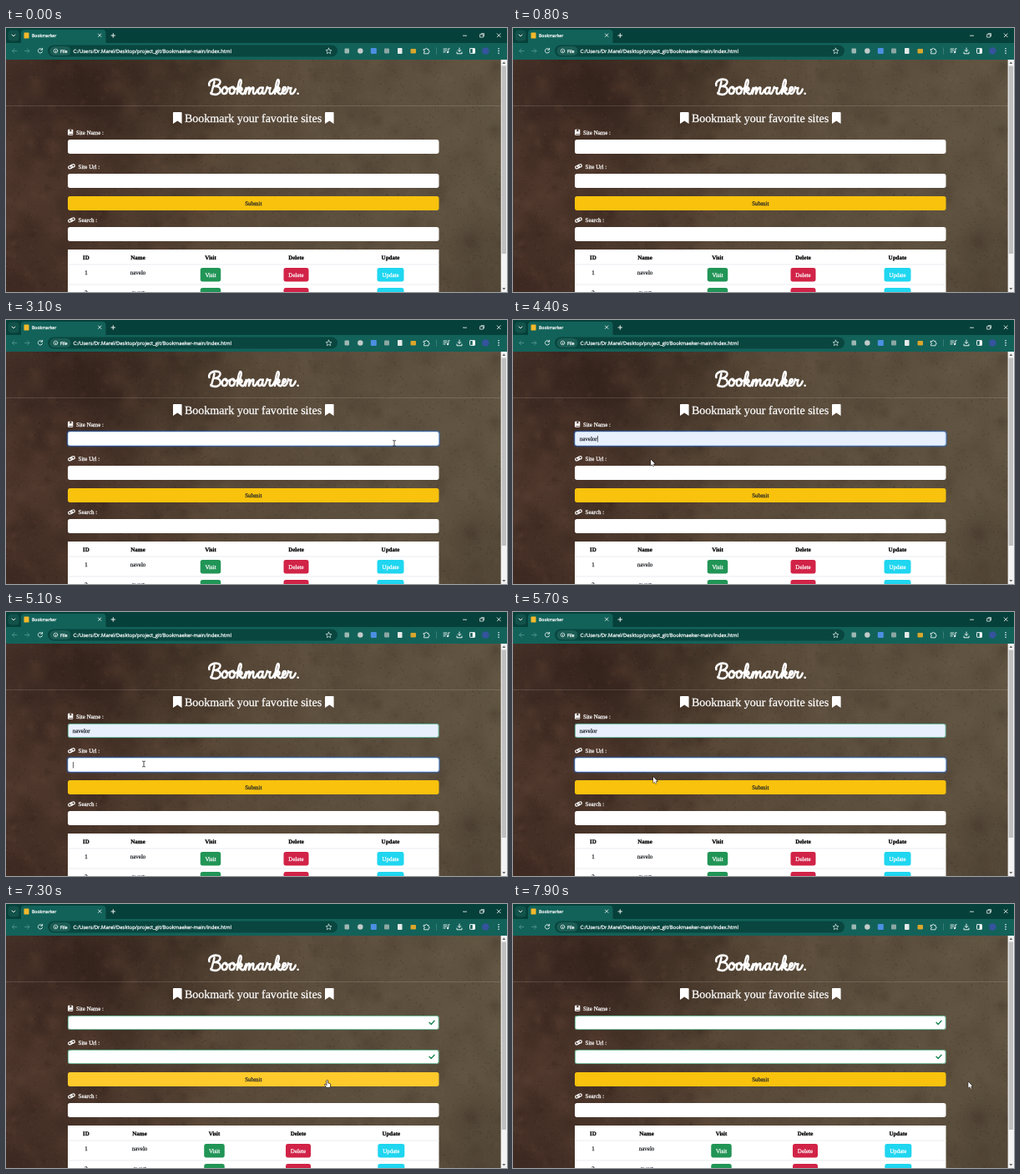
An HTML page with a canvas for the animation above (8 s loop, 600 px wide and 317 px high).

```html
<!DOCTYPE html>
<html lang="en">
<head>
<meta charset="utf-8">
<title>Bookmarker</title>
<style>
html, body { margin: 0; width: 100%; height: 100%; overflow: hidden; background: #4c3a2e; }
canvas { display: block; width: 600px; height: 317px; }
</style>
</head>
<body>
<canvas id="stage" width="600" height="317" role="img" aria-label="Bookmarker. Bookmark your favorite sites"></canvas>
<script>
const W = 600, H = 317, LOOP = 8000, PAGE_W = 592.7;
const SERIF = '"Liberation Serif", serif', SANS = '"Open Sans", sans-serif';
const LEFT = 74, WIDTH = 444.5, FIELD_H = 17;
const NAME_Y = 134, URL_Y = 175, SUBMIT_Y = 202, SEARCH_Y = 239;
const SITE = 'navelor', SITE_URL = 'navelor.com';
const T = { focusName: 2600, fillName: 4200, focusUrl: 4800, fillUrl: 5900, submit: 6700 };
const GREEN = '#198754';

const screen = document.getElementById('stage').getContext('2d');
const backdrop = document.createElement('canvas');
backdrop.width = W;
backdrop.height = H;
let g = backdrop.getContext('2d');

function rect(x, y, w, h, color) {
  g.fillStyle = color;
  g.fillRect(x, y, w, h);
}
function box(x, y, w, h, r, color) {
  g.beginPath();
  g.roundRect(x, y, w, h, r);
  g.fillStyle = color;
  g.fill();
}
function outline(x, y, w, h, r, color, line) {
  g.beginPath();
  g.roundRect(x, y, w, h, r);
  g.strokeStyle = color;
  g.lineWidth = line;
  g.stroke();
}
function disc(x, y, r, color) {
  g.beginPath();
  g.arc(x, y, r, 0, Math.PI * 2);
  g.fillStyle = color;
  g.fill();
}
function stroke(d, color = '#fff', line = 1) {
  g.strokeStyle = color;
  g.lineWidth = line;
  g.lineCap = g.lineJoin = 'round';
  g.stroke(new Path2D(d));
}
function fill(d, color = '#fff') {
  g.fillStyle = color;
  g.fill(new Path2D(d));
}
// A hairline around the glyphs keeps small text from looking thin.
function text(s, x, y, size, { color = '#fff', family = SERIF, align = 'left', weight = '' } = {}) {
  g.font = `${weight} ${size}px ${family}`;
  g.textRendering = 'geometricPrecision';
  g.textAlign = align;
  g.lineJoin = 'round';
  g.lineWidth = .25;
  g.fillStyle = g.strokeStyle = color;
  g.fillText(s, x, y);
  g.strokeText(s, x, y);
}
function at(x, y, draw) {
  g.save();
  g.translate(x, y);
  draw();
  g.restore();
}

function glow(x, y, r, rgb, alpha) {
  const soft = g.createRadialGradient(x, y, 0, x, y, r);
  soft.addColorStop(0, `rgba(${rgb},${alpha})`);
  soft.addColorStop(1, `rgba(${rgb},0)`);
  g.fillStyle = soft;
  g.fillRect(x - r, y - r, 2 * r, 2 * r);
}

function drawWall() {
  let seed = 41;
  const rnd = () => (seed = (seed * 16807) % 2147483647) / 2147483647;
  const spot = () => [rnd() * PAGE_W, 38 + rnd() * 279];
  const base = g.createLinearGradient(0, 38, 592, 70);
  [[0, '#4b352b'], [.18, '#4a352a'], [.4, '#554535'], [.65, '#5c4e3d'], [1, '#5f5341']]
    .forEach(([p, c]) => base.addColorStop(p, c));
  rect(0, 38, PAGE_W, 279, base);
  glow(90, 75, 130, '36,22,17', .5);
  glow(215, 60, 70, '36,24,18', .3);
  glow(20, 317, 110, '40,22,18', .3);
  glow(590, 317, 120, '50,40,30', .35);
  glow(25, 190, 90, '104,66,50', .15);
  for (let i = 0; i < 700; i++) {
    const [x, y] = spot(), left = x < 250, dark = rnd() < .55;
    glow(x, y, 3 + rnd() ** 2 * 26, dark ? '30,17,13' : left ? '125,86,68' : '130,114,88', left ? .13 : .07);
  }
  for (let i = 0; i < 6500; i++) {
    const [x, y] = spot(), size = .6 + rnd() * .9;
    rect(x, y, size, size, rnd() < .52 ? 'rgba(25,14,10,.16)' : 'rgba(165,140,110,.11)');
  }
}

function drawBrowser() {
  rect(0, 0, W, 19, '#06403a');
  rect(0, 18, W, 20, '#12625a');
  box(2.5, 2.5, 13, 13, 4, '#12524a');
  stroke('M7 8l2 2 2-2', '#fff', .9);
  box(18, 2, 101.5, 20, [4, 4, 0, 0], '#12625a');
  box(21.5, 5.5, 6, 7, .5, '#f4b92b');
  text('Bookmarker', 31, 11, 5.1, { family: SANS });
  stroke('M110.5 7l3.4 3.4M113.9 7l-3.4 3.4', '#fff', .8);
  stroke('M126 9h4.6M128.3 6.7v4.6', '#fff', .9);
  stroke('M547.5 9.2h4', '#fff', .8);
  stroke('M568 7.7h3.4v3.4h-3.4zM569.2 6.6h3.3v3.3', '#fff', .7);
  stroke('M588.2 6.8l4 4M592.2 6.8l-4 4', '#fff', .8);

  stroke('M13 27.5H7.5M10 25l-2.5 2.5 2.5 2.5', '#4f948b', .9);
  stroke('M22.5 27.5H28M25.5 25l2.5 2.5-2.5 2.5', '#4f948b', .9);
  stroke('M43.3 25.8a2.7 2.7 0 1 0 .3 2.6M43.6 24.3v1.9h-1.9', '#e8f3f1', .9);
  box(50, 20.5, 347, 14, 7, '#08463f');
  box(52.5, 22, 25, 11, 5.5, '#1b5d55');
  g.beginPath();
  g.arc(59.5, 27.5, 2.3, 0, 7);
  g.strokeStyle = '#fff';
  g.lineWidth = .7;
  g.stroke();
  stroke('M59.5 27.3v1.3', '#fff', .7);
  text('File', 65, 29.5, 5.4, { family: SANS });
  text('C:/Users/Dr.Marel/Desktop/project_git/Bookmaeker-main/index.html', 80.5, 29.6, 5.92, { family: SANS });
  stroke('M386.5 24.2l1 2.2 2.4.3-1.8 1.6.5 2.4-2.1-1.2-2.1 1.2.5-2.4-1.8-1.6 2.4-.3z', '#e8f3f1', .7);

  box(405.5, 24.5, 5.5, 6, 1, '#9db7b1');
  disc(424.3, 27.5, 3.2, '#c3cbc9');
  box(436.8, 24, 7, 7, 1, '#4b8fe2');
  box(453, 24.5, 6, 6, 1, '#8ba7a2');
  box(469, 24, 5.5, 7, .8, '#e4eae8');
  box(484.5, 25, 6.5, 5.5, 1, '#d9a62b');
  stroke('M500.5 25.5h1.8a1.1 1.1 0 1 1 2.2 0h1.5v1.7a1.1 1.1 0 1 1 0 2.2v1.4h-5.5v-1.7a1 1 0 0 0 0-2z', '#fff', .8);
  rect(515, 23.5, .7, 8, '#4b8b82');
  stroke('M524 25h4M524 27h4M524 29h2.2M529.8 28.8v-4h1.4', '#fff', .8);
  disc(529, 29.2, 1.1, '#fff');
  stroke('M543 24v4M541.2 26.5l1.8 1.8 1.8-1.8M540 29v1.8h6V29', '#fff', .9);
  outline(555.5, 24.6, 6, 5.8, .7, '#fff', .9);
  rect(558.7, 24.6, 2.8, 5.8, '#fff');
  disc(574.3, 27.5, 4.3, '#34539c');
  [24.8, 27.5, 30.2].forEach(y => disc(590, y, .8, '#fff'));

  rect(PAGE_W, 38, W - PAGE_W, 279, '#f3f3f3');
  rect(593.7, 45.5, 5.3, 225.5, '#bfbfbf');
  fill('M596.3 40.5l2 2.6h-4z', '#666');
  fill('M596.3 314.6l2-2.6h-4z', '#666');
}

function drawTitle() {
  const o = 'M265 71C260 69.5 258 78.5 262 79C267 79.5 268 71 264 71C265 74 268 74 270 72';
  const k = 'M280.5 73.5C285 69 285 61.5 283 62C280.5 63 279.8 72 279 79C279.5 74 284 70.5 285 72.5C286 75.5 282 76 281 75.5C283 76 283.5 80 287 79C288.5 78 289 76 289.5 74';
  const r = 'M317.5 71C318 72.5 320 72.5 321.5 72C320 75 319.5 79 322 79C324 79 326 76 327 73.5';
  const letters = [
    [0, 'M250 64.5C249 69 247.5 74 246 79M243.5 69C242 63 250 60.8 255 62C260 63.5 257 69.5 250.5 70C258 69.5 260 76 255 78.8C252 80.5 247.5 80 245.5 78'],
    [0, o], [9.5, o], [0, k],
    [0, 'M290.5 72L289.5 79C290.5 74 294 70 295 72L294 79C295.5 74 299 70 300 72C300 75 298 79 301 79C303 79 304 76 305 74'],
    [0, 'M311 72C306 69.5 304 78.5 307.5 79C310 79 311.5 75 312 71.5C311 76 311 79 313 79C315 79 316 75 317.5 71'],
    [0, r], [48, k],
    [0, 'M337 76C341 75.5 342 71 339.5 71C336.5 71 335.5 79 339 79C341.5 79 343 76 344 72'],
    [26.5, r], [0, 'M356.4 78.8h.2']
  ];
  g.save();
  g.translate(242, 0);
  g.scale(.94, 1);
  for (const [dx, d] of letters) at(dx - 242, 0, () => stroke(d, '#fff', 2.6));
  g.restore();
}

function linkIcon(y) {
  at(78.5, y, () => {
    g.rotate(-.3);
    outline(-4, -1.3, 5, 3.2, 1.6, '#fff', 1.2);
    outline(-1, -1.9, 5, 3.2, 1.6, '#fff', 1.2);
  });
}

function drawPage() {
  drawTitle();
  rect(0, 93, PAGE_W, .7, 'rgba(255,255,255,.2)');
  for (const x of [200, 382]) fill(`M${x} 102q0-1 1-1h8.6q1 0 1 1v13l-5.3-3.6-5.3 3.6z`);
  text('Bookmark your favorite sites', 296, 113, 14.05, { align: 'center' });
  box(74, 121.8, 6.3, 7, 1, '#fff');
  rect(75.3, 127, 4.4, .7, '#4a362c');
  fill('M76.4 121.8h2v3l-1-.8-1 .8z', '#4a362c');
  linkIcon(166.3);
  linkIcon(230.5);
  text('Site Name :', 84, 127.7, 7);
  text('Site Url :', 86.5, 168.7, 7);
  text('Search :', 86.5, 233, 7);
  box(LEFT, SEARCH_Y, WIDTH, FIELD_H, 2.7, '#fff');
}

function drawField(y, { value = '', filled, focused, valid, check, caret }) {
  if (focused) {
    outline(LEFT - .6, y - .6, WIDTH + 1.2, FIELD_H + 1.2, 3.2,
      valid ? 'rgba(25,135,84,.3)' : 'rgba(13,110,253,.3)', 1.8);
  }
  box(LEFT, y, WIDTH, FIELD_H, 2.7, filled ? '#e8f0fe' : '#fff');
  if (valid) outline(LEFT + .3, y + .3, WIDTH - .6, FIELD_H - .6, 2.6, GREEN, .7);
  else if (focused) outline(LEFT + .3, y + .3, WIDTH - .6, FIELD_H - .6, 2.6, '#86b7fe', .6);
  text(value, 79.7, y + 10.7, 7, { color: '#212529' });
  if (caret) rect(80 + g.measureText(value).width, y + 5, .7, 7.5, '#222');
  if (check) stroke(`M507 ${y + 8.3}l2.2 2.3 3.8-4.4`, GREEN, 1.4);
}

function drawTable(wide) {
  const [name, visit, del, update] = wide ? [160, 249.5, 350, 461.3] : [158, 245, 347.5, 460.5];
  const dark = { color: '#212529', align: 'center' };
  const bold = { ...dark, color: '#000', weight: 'bold' };
  const buttons = [['Visit', visit, 24.5, '#219556'], ['Delete', del, 30, '#d12347'], ['Update', update, 32, '#1fd6f0']];
  rect(LEFT, 266, WIDTH, 51, '#fff');
  text('ID', 96, 277.5, 7, bold);
  text('Name', name, 277.5, 7, bold);
  for (const [label, x] of buttons) text(label, x, 277.5, 7, bold);
  ['navelo', 'qwert'].forEach((site, i) => {
    const y = 284 + i * 24;
    rect(LEFT, y - .3, WIDTH, .6, '#dee2e6');
    text(String(i + 1), 96, y + 11.5, 7, dark);
    text(site, name, y + 11.5, 7, dark);
    for (const [label, x, w, color] of buttons) {
      box(x - w / 2, y + 4, w, 16.5, 2.7, color);
      text(label, x, y + 14.6, 7, { align: 'center' });
    }
  });
}

// time, x, y of the pointer's hot spot
const PATH = [
  [1900, 606, 262], [2400, 465, 148], [3250, 465, 148], [4200, 165, 167.5],
  [4500, 165, 167.5], [4800, 165, 182.5], [5300, 165, 182.5], [5700, 168, 198],
  [6000, 168, 198], [6250, 193, 209], [6850, 193, 209], [7700, 545.3, 213.5]
];
function pointerAt(t) {
  const i = PATH.findIndex(p => p[0] > t);
  if (i === 0) return null;
  if (i < 0) return { x: PATH.at(-1)[1], y: PATH.at(-1)[2] };
  const [t0, x0, y0] = PATH[i - 1], [t1, x1, y1] = PATH[i];
  const p = (t - t0) / (t1 - t0), e = p * p * (3 - 2 * p);
  return { x: x0 + (x1 - x0) * e, y: y0 + (y1 - y0) * e };
}
const inside = (p, y) => p && p.x > LEFT && p.x < LEFT + WIDTH && p.y > y && p.y < y + FIELD_H;

function drawPointer(p, hand) {
  at(p.x, p.y, () => {
    if (hand) {
      const d = 'M-.9.5Q0-.6.9.5V3.5L3.2 4.1Q4.2 4.4 4.1 5.6L3.5 9H-.8L-3.2 5.8Q-3.3 4.5-2 4.9L-.9 6z';
      fill(d);
      stroke(d, '#111', .7);
    } else if ([NAME_Y, URL_Y, SEARCH_Y].some(y => inside(p, y))) {
      stroke('M-1.5-3.3H-.5L0-2.8.5-3.3H1.5M0-2.8V2.8M-1.5 3.3H-.5L0 2.8.5 3.3H1.5', '#222', .8);
    } else {
      const d = 'M0 0V7.3L1.7 5.8 2.8 8.2 3.9 7.7 2.8 5.3H5z';
      stroke(d, '#111', .9);
      fill(d);
    }
  });
}

function draw(t) {
  g.drawImage(backdrop, 0, 0);
  const sent = t >= T.submit, nameDone = t >= T.fillName && !sent, urlDone = t >= T.fillUrl && !sent;
  const onName = t >= T.focusName && t < T.focusUrl, onUrl = t >= T.focusUrl && !sent;
  const blink = since => (t - since) % 1000 < 500;
  drawField(NAME_Y, {
    value: nameDone ? SITE : '', filled: nameDone, focused: onName, valid: t >= T.focusUrl,
    check: sent, caret: onName && blink(nameDone ? T.fillName : T.focusName)
  });
  drawField(URL_Y, {
    value: urlDone ? SITE_URL : '', filled: urlDone, focused: onUrl, valid: t >= T.fillUrl,
    check: sent, caret: onUrl && blink(urlDone ? T.fillUrl : T.focusUrl)
  });
  const pointer = pointerAt(t), hover = inside(pointer, SUBMIT_Y);
  box(LEFT, SUBMIT_Y, WIDTH, FIELD_H, 2.7, hover ? '#ffca2c' : '#f8c20d');
  text('Submit', 296.3, SUBMIT_Y + 10.8, 7, { color: '#212529', align: 'center' });
  drawTable(sent);
  if (pointer) drawPointer(pointer, hover);
}

drawWall();
drawBrowser();
drawPage();
g = screen;

let start;
function tick(now) {
  start ??= now;
  draw((now - start) % LOOP);
  requestAnimationFrame(tick);
}
requestAnimationFrame(tick);
</script>
</body>
</html>
```
